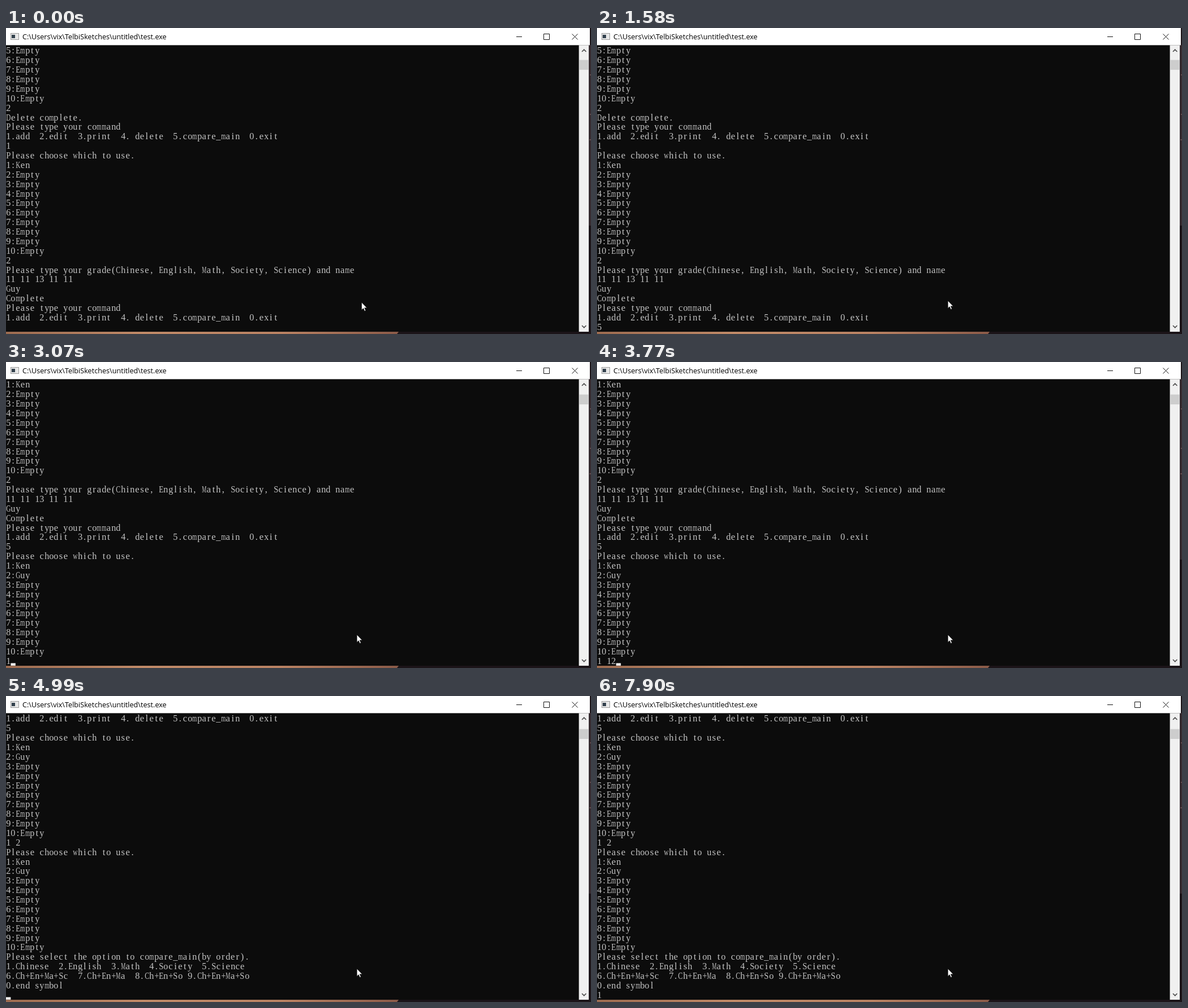
Animation, 1034 px wide and 542 px high, one loop 8000 ms. Source, as an HTML page:

```html
<!DOCTYPE html>
<html lang="en">
<head>
<meta charset="utf-8">
<title>Console</title>
<style>
  html, body { margin: 0; width: 100%; height: 100%; overflow: hidden; background: #0c0c0c; }
  #stage { position: absolute; left: 0; top: 0; width: 1034px; height: 542px; overflow: hidden; }
  svg { position: absolute; left: 0; top: 0; }
  #screen { position: absolute; left: 0; top: 32.4px; color: #c4c4c4; font: 16.8px/16.88px "Liberation Serif", serif; }
  .row { display: flex; height: 16.88px; white-space: pre; }
  .row span { flex: none; display: flex; justify-content: center; width: 8.44px; }
</style>
</head>
<body>
<div id="stage">
  <svg width="1034" height="542" viewBox="0 0 1034 542">
    <defs>
      <linearGradient id="desk">
        <stop offset="0" stop-color="#9c6b50"/>
        <stop offset=".35" stop-color="#c08a68"/>
        <stop offset=".7" stop-color="#b98263"/>
        <stop offset="1" stop-color="#8a5a48"/>
      </linearGradient>
    </defs>
    <rect width="1034" height="542" fill="#1b1418"/>
    <path d="M0 538H694L691 542H0Z" fill="url(#desk)"/>
    <rect x="1030" y="30" width="4" height="320" fill="#352a2f"/>
    <path d="M1032 83h2M1032 153h2M1031 198h3" stroke="#8b6a68"/>
    <rect width="1030" height="538" fill="#0c0c0c"/>
    <rect width="1032" height="30.4" fill="#fff"/>
    <rect x="8.5" y="9.5" width="14" height="11" fill="#e8e8e8" stroke="#9a9a9a"/>
    <rect x="10" y="12" width="6" height="6" fill="#33414d"/>
    <text x="29" y="19.5" font-family="Open Sans, sans-serif" font-size="12.65" fill="#000">C:\Users\vix\TelbiSketches\untitled\test.exe</text>
    <path d="M902 15.5h10M950.5 10.5h10v10h-10zM1000.5 10.5l10 10M1010.5 10.5l-10 10" fill="none" stroke="#111"/>
    <rect x="1012.6" y="30.4" width="17.4" height="507.6" fill="#f0f0f0"/>
    <rect id="thumb" x="1013.5" width="16" height="17.5" fill="#cdcdcd"/>
    <path d="M1018 42l3.7-3.7 3.7 3.7M1018 527l3.7 3.7 3.7-3.7" fill="none" stroke="#505050" stroke-width="1.7"/>
  </svg>
  <div id="screen"></div>
  <svg width="1034" height="542" viewBox="0 0 1034 542">
    <rect id="caret" y="533.4" width="8.4" height="4.4" fill="#f2f2f2"/>
    <path id="pointer" d="M0 0V13.4L3 10.6L5.2 15.4L7.2 14.5L5.1 9.8H9.4Z" fill="#fff" stroke="#000" stroke-width=".6"/>
  </svg>
</div>
<script>
const LOOP = 8000, CELL = 8.44, ROWS = 29;
const $ = id => document.getElementById(id);

const list = (...names) => Array.from({ length: 10 }, (_, i) => `${i + 1}:${names[i] || "Empty"}`);
const ask = "Please type your command";
const menu = "1.add  2.edit  3.print  4. delete  5.compare_main  0.exit";
const choose = "Please choose which to use.";

const log = [
  ...list().slice(4), "2", "Delete complete.", ask, menu, "1",
  choose, ...list("Ken"), "2",
  "Please type your grade(Chinese, English, Math, Society, Science) and name",
  "11 11 13 11 11", "Guy", "Complete", ask, menu, "5",
  choose, ...list("Ken", "Guy"), "1 2",
  choose, ...list("Ken", "Guy"),
  "Please select the option to compare_main(by order).",
  "1.Chinese  2.English  3.Math  4.Society  5.Science",
  "6.Ch+En+Ma+Sc  7.Ch+En+Ma  8.Ch+En+So 9.Ch+En+Ma+So",
  "0.end symbol"
];

// time, first visible line, typed text, caret shown
const steps = [
  [0, 0, "", 0], [560, 0, "", 1], [1070, 0, "", 0], [1400, 0, "5", 1], [1580, 0, "5", 0],
  [2090, 12, "", 1], [2660, 12, "", 0], [3070, 12, "1", 1], [3170, 12, "1", 0],
  [3530, 12, "1 ", 1], [3670, 12, "1 1", 1], [3770, 12, "1 12", 1], [4230, 12, "1 12", 0],
  [4270, 12, "1 1", 1], [4410, 12, "1 ", 1], [4600, 12, "1 2", 1], [4770, 12, "1 2", 0],
  [4990, 28, "", 1], [5800, 28, "", 0], [6310, 28, "", 1], [6860, 28, "", 0],
  [7370, 28, "", 1], [7430, 28, "1", 1], [7900, 28, "1", 0]
];

const pen = document.createElement("canvas").getContext("2d");
pen.font = '16.8px "Liberation Serif", serif';

// Every glyph sits in one console cell; wide ones are condensed.
function cell(ch) {
  const span = document.createElement("span");
  const fit = (CELL - 0.3) / pen.measureText(ch).width;
  span.textContent = ch;
  if (fit < 1) span.style.transform = `scaleX(${fit})`;
  return span;
}

function row(text) {
  const div = document.createElement("div");
  div.className = "row";
  div.append(...[...text].map(cell));
  return div;
}

let shown = "";
function draw(t) {
  const [, top, typed, caret] = steps.findLast(s => s[0] <= t);
  const key = top + "|" + typed;
  if (key !== shown) {
    $("screen").replaceChildren(...log.slice(top, top + ROWS).concat(typed).map(row));
    shown = key;
  }
  $("caret").setAttribute("x", typed.length * CELL);
  $("caret").setAttribute("visibility", caret ? "visible" : "hidden");
  $("thumb").setAttribute("y", 56.6 + Math.round(top / 14));
  $("pointer").setAttribute("transform", t < 790 ? "translate(628.6 486)" : "translate(620.2 483)");
}

const start = performance.now();
function tick() {
  draw((performance.now() - start) % LOOP);
  requestAnimationFrame(tick);
}
tick();
</script>
</body>
</html>
```
